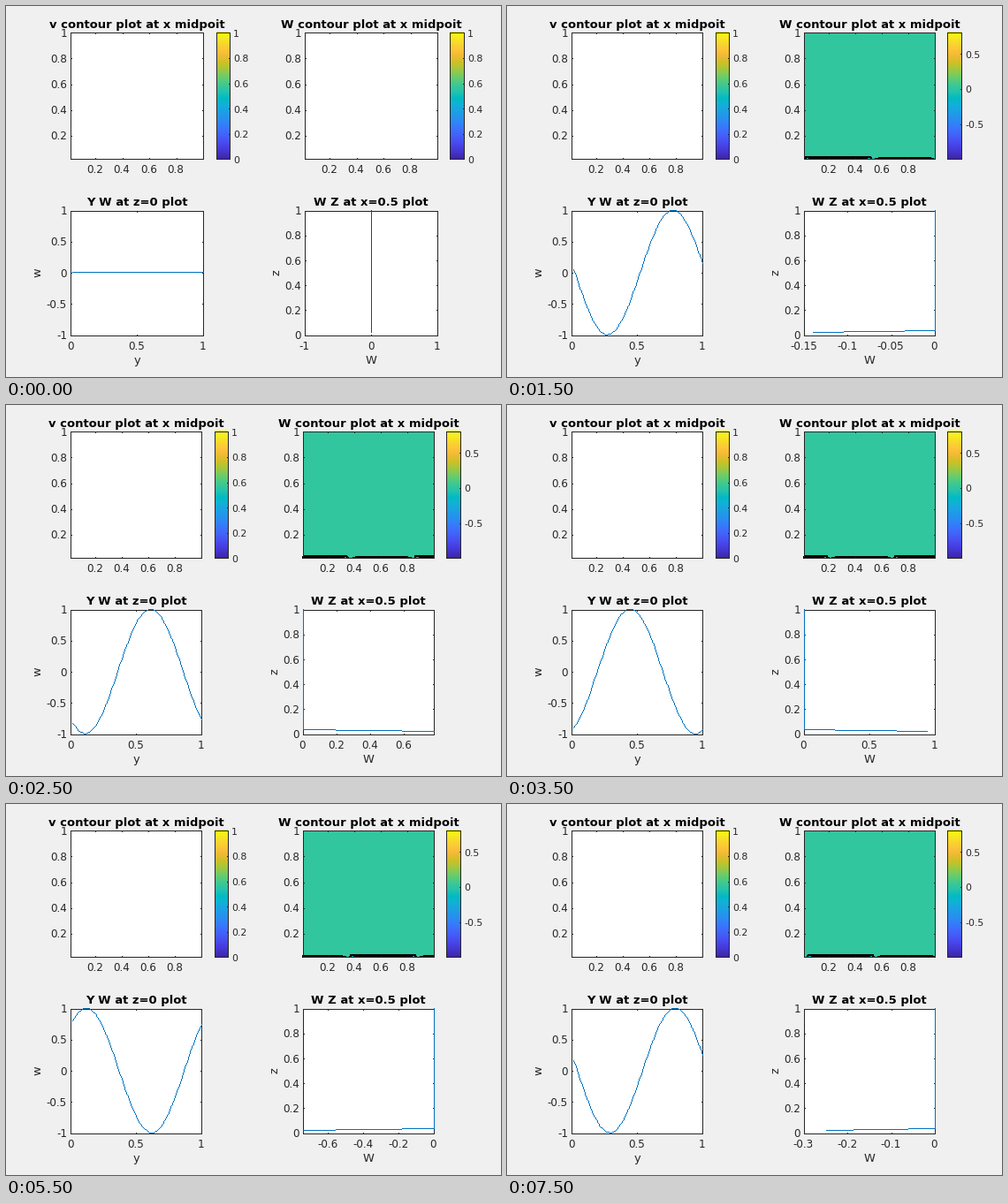
Animation, 560 px wide and 420 px high, one loop 8 s. Source, as a matplotlib script:

```python
import numpy as np
import matplotlib.pyplot as plt
from matplotlib.animation import FuncAnimation
from matplotlib.collections import PolyCollection
from matplotlib.colors import LinearSegmentedColormap

W, H, DPI = 560, 420, 100
FRAMES, INTERVAL = 16, 500
PX = 72 / DPI
N = 64
INK, BLUE = "#262626", "#0072bd"
GRID = np.arange(1, N + 1) / N
TOP, BOTTOM = (29.4, 172.4), (230.6, 371.6)

PARULA = LinearSegmentedColormap.from_list("parula", [
    (i / 63, rgb) for i, *rgb in (
        (0, .2422, .1504, .6603), (5, .2751, .2342, .8710),
        (9, .2810, .3228, .9579), (14, .2440, .4358, .9988),
        (18, .1786, .5289, .9682), (27, .0689, .6948, .8394),
        (30, .0067, .7312, .7660), (33, .1408, .7584, .6842),
        (36, .2161, .7843, .5923), (40, .3909, .8029, .4354),
        (45, .6720, .7793, .2227), (48, .8203, .7498, .1535),
        (51, .9393, .7288, .2100), (54, .9970, .7659, .2199),
        (58, .9676, .8639, .1643), (63, .9769, .9839, .0805))])

plt.rcParams["font.family"] = "DejaVu Sans"
fig = plt.figure(figsize=(W / DPI, H / DPI), dpi=DPI, facecolor="#f0f0f0")
ax = fig.add_axes([0, 0, 1, 1])


def text(x, y, s, size=12, **kw):
    opts = dict(ha="center", va="baseline", color=INK, zorder=5)
    ax.text(x, y, s, fontsize=size * PX, **{**opts, **kw})


def line(x, y):
    ax.plot(np.round(x), np.round(y), color=INK, lw=PX, antialiased=False,
            zorder=2, solid_capstyle="butt")


def trace(x, y, color):
    """Draw a polyline one pixel thick, without smoothing."""
    pts = np.round(np.column_stack([x, y]))
    runs = [np.linspace(a, b, int(abs(b - a).max()) + 1)
            for a, b in zip(pts[:-1], pts[1:])]
    cells = np.unique(np.round(np.vstack(runs)), axis=0)
    corners = np.array([(0, 0), (1, 0), (1, -1), (0, -1)])
    ax.add_collection(PolyCollection(cells[:, None] + corners, fc=color,
                                     ec="none", lw=0, antialiased=False,
                                     zorder=3), autolim=False)


def num(v):
    return f"{round(v, 2) + 0:g}"


def scale(v, lim, a, b):
    return a + (np.asarray(v) - lim[0]) / (lim[1] - lim[0]) * (b - a)


class Panel:
    """A boxed plot placed in pixel coordinates."""

    def __init__(self, x0, x1, rows, xlim, ylim):
        self.x0, self.x1 = x0, x1
        self.y0, self.y1 = rows
        self.xlim, self.ylim = xlim, ylim
        ax.add_patch(plt.Rectangle((x0, self.y0), x1 - x0, self.y1 - self.y0,
                                   fc="white", ec="none", zorder=0))

    def px(self, v):
        return scale(v, self.xlim, self.x0, self.x1)

    def py(self, v):
        return scale(v, self.ylim, self.y1, self.y0)

    def frame(self, xticks, yticks, title):
        x0, x1, y0, y1 = self.x0, self.x1, self.y0, self.y1
        line([x0, x1, x1, x0, x0], [y0, y0, y1, y1, y0])
        for t in xticks:
            x = float(self.px(t))
            line([x, x], [y1, y1 - 1])
            line([x, x], [y0, y0 + 1])
            text(x - .5, y1 + 16, num(t))
        for t in yticks:
            y = float(self.py(t))
            line([x0, x0 + 1], [y, y])
            line([x1, x1 - 1], [y, y])
            text(x0 - 4, y + 4.6, num(t), ha="right")
        text((x0 + x1) / 2, y0 - 5.4, title, 13.1, color="black",
             weight="bold")

    def labels(self, xlabel, ylabel, yx):
        text((self.x0 + self.x1) / 2, self.y1 + 32.4, xlabel, 13)
        text(yx, (self.y0 + self.y1) / 2, ylabel, 13, rotation=90,
             rotation_mode="anchor")


def colorbar(x0, x1, lim, ticks):
    y0, y1 = TOP
    ax.imshow(np.linspace(1, 0, 256)[:, None], cmap=PARULA, aspect="auto",
              extent=(x0, x1, y1, y0), interpolation="nearest", zorder=1)
    line([x0, x1, x1, x0, x0], [y0, y0, y1, y1, y0])
    for t in ticks:
        y = float(scale(t, lim, y1, y0))
        line([x1, x1 - 1], [y, y])
        text(x1 + 4, y + 4.4, num(t), 11, ha="left")


def contours(panel, w):
    field = np.zeros((N, N))
    field[0] = w
    x, y = panel.px(GRID), panel.py(GRID)
    levels = np.linspace(-1, .8, 10)
    colors = PARULA((levels + 1) / 1.8)
    levels[5] = -1e-6  # flat zero belongs to the band above
    ax.contourf(x, y, field, levels=[-1.01, *levels[1:], 1.01],
                colors=colors, antialiased=False, zorder=1)
    ax.contour(x, y, field, levels=levels[1:], colors="black",
               linestyles="solid", linewidths=PX, antialiased=False,
               zorder=1.5)


def auto_axis(v):
    """Limits and ticks for a line running from zero to v."""
    a = abs(v)
    if a == 0:
        return (-1, 1), [-1, 0, 1]
    if a > .8:
        end, step = 1, .5
    elif a > .4:
        end, step = a, .2
    else:
        end, step = next(p for p in ((.15, .05), (.2, .1), (.3, .1), (.4, .2))
                         if a <= p[0])
    ticks = np.arange(int(end / step + 1e-6) + 1) * step
    return ((0, end), ticks) if v > 0 else ((-end, 0), -ticks[::-1])


def draw(k):
    ax.clear()
    ax.set_axis_off()
    # a whole-number point is the lower left corner of its pixel
    ax.set(xlim=(0, W), ylim=(H - 1, -1))

    still = k == 0
    phase = .314 + .08186 * (k - 1)
    w = np.zeros(N) if still else np.sin(2 * np.pi * (GRID + phase))
    mid = w[N // 2 - 1]
    l0, l1 = 73, 223 if still else 221
    r0, r1 = (338, 488) if still else (336, 484)

    inner, fifths = (1 / N, 1), np.arange(6) / 5
    for x0, x1, name in ((l0, l1, "v"), (r0, r1, "W")):
        p = Panel(x0, x1, TOP, inner, inner)
        if name == "W" and not still:
            contours(p, w)
        p.frame(fifths[1:5], fifths[1:], f"{name} contour plot at x midpoit")

    colorbar(l1 + 15, l1 + 30, (0, 1), fifths)
    if still:
        colorbar(502, 518, (0, 1), fifths)
    else:
        colorbar(498, 514, (-1, .8), (-.5, 0, .5))

    p = Panel(l0, l1, BOTTOM, (0, 1), (-1, 1))
    p.frame((0, .5, 1), np.linspace(-1, 1, 5), "Y W at z=0 plot")
    p.labels("y", "w", 39)
    trace(p.px(GRID), p.py(w), BLUE)

    lim, ticks = auto_axis(mid)
    p = Panel(r0, r1, BOTTOM, lim, (0, 1))
    p.frame(ticks, fifths, "W Z at x=0.5 plot")
    p.labels("W", "z", r0 - 29)
    trace(p.px([mid, 0, 0]), p.py([1 / N, 2 / N, 1]),
          "#404040" if still else BLUE)


anim = FuncAnimation(fig, draw, frames=FRAMES, interval=INTERVAL,
                     init_func=lambda: draw(0), repeat=True, repeat_delay=0)
plt.show()
```
